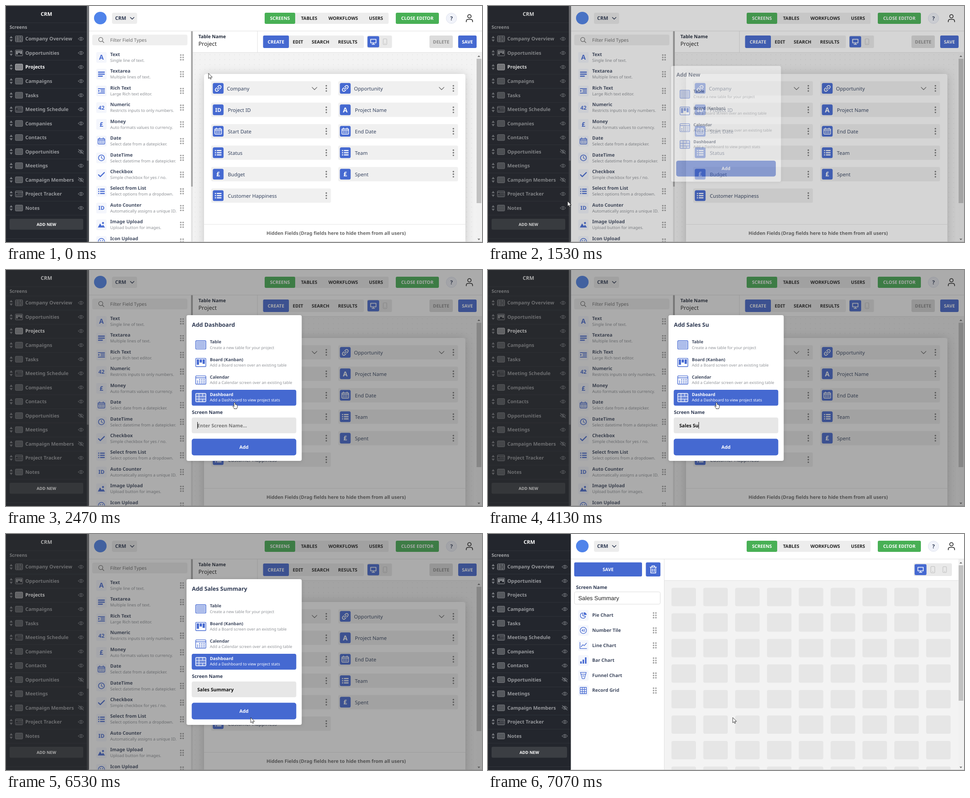
Animation, 1060 px wide and 528 px high, one loop 8.59 s. Source, as an HTML page:

```html
<!DOCTYPE html>
<html lang="en">
<head>
<meta charset="utf-8">
<title>Add a dashboard screen</title>
<style>
html, body { margin: 0; width: 100%; height: 100%; overflow: hidden; background: #fff; }
svg { display: block; font-family: "Noto Sans", "Open Sans", sans-serif; }
text { white-space: pre; text-rendering: geometricPrecision; }
</style>
</head>
<body>
<svg id="stage" width="1060" height="528" viewBox="0 0 1060 528"></svg>
<script>
const BLUE = '#4569d1', GREEN = '#48b055', INK = '#303b54', SOFT_INK = '#414b61', GREY = '#8d9095';
const LOOP = 8590, STEP = 1000 / 15;

const rect = (x, y, w, h, fill, rx = 0, extra = '') =>
  `<rect x="${x}" y="${y}" width="${w}" height="${h}" rx="${rx}" fill="${fill}" ${extra}/>`;
const text = (x, y, str, size, weight = 400, fill = INK, anchor = 'start', extra = '') =>
  `<text x="${x}" y="${y}" font-size="${size}" font-weight="${weight}" fill="${fill}" text-anchor="${anchor}" ${extra}>${str}</text>`;
const mid = (x, y, str, size, weight, fill) => text(x, y, str, size, weight, fill, 'middle');
const line = (d, color, width = 1, fill = 'none') =>
  `<path d="${d}" fill="${fill}" stroke="${color}" stroke-width="${width}" stroke-linecap="round" stroke-linejoin="round"/>`;
const shape = (d, fill) => `<path d="${d}" fill="${fill}"/>`;
const dot = (x, y, r, fill) => `<circle cx="${x}" cy="${y}" r="${r}" fill="${fill}"/>`;
const ring = (x, y, r, color, width) =>
  `<circle cx="${x}" cy="${y}" r="${r}" fill="none" stroke="${color}" stroke-width="${width}"/>`;
const at = (x, y, body, scale = 1) => `<g transform="translate(${x} ${y}) scale(${scale})">${body}</g>`;
const each = (list, fn) => list.map(fn).join('');
const times = (n, fn) => Array.from({ length: n }, (_, i) => fn(i)).join('');
const button = (x, y, w, h, label, fill, color = '#fff', size = 10.2, rx = 3) =>
  rect(x, y, w, h, fill, rx) + mid(x + w / 2, y + h / 2 + size * .36, label, size, 700, color);

// Screen type icons, 24 x 20 around the origin
const screenIcons = {
  table: c => times(5, i => line(`M-9 ${-6 + i * 3}H9`, c, .9)),
  board: c => shape('M-9-7h5v12h-5zM-2.5-7h5v7h-5zM4-7h5v10h-5z', c),
  cal: c => line('M-11-5H11', c, 1.6) +
    times(12, i => i ? dot(-7 + i % 4 * 4.7, -1.2 + Math.floor(i / 4) * 3.7, 1.2, c) : ''),
  dash: c => line('M-11-2.5H11M-11 3.5H11M-4-9V-2.5M4-9V-2.5M-4-2.5V9M4 3.5V9', c, 1.1)
};
const screenIcon = (type, x, y, c, scale = 1) => {
  const tint = type === 'table' || type === 'dash' ? .2 : 0;
  return at(x, y, rect(-11.3, -9.3, 22.6, 18.6, c, 1.5,
    `fill-opacity="${tint}" stroke="${c}" stroke-width="1.4"`) + screenIcons[type](c), scale);
};

// Field and chart icons, about 16 x 16 around the origin
const letter = (s, size) => c => mid(0, size * .36, s, size, 700, c);
const glyphs = {
  text: letter('A', 15), num: letter('42', 12), money: letter('£', 14), id: letter('ID', 12),
  area: c => line('M-6.5-4.5H6.5M-6.5 0H6.5M-6.5 4.5H2', c, 2.4),
  rich: c => line('M-7-5H7M-1-1.7H7M-1 1.7H7M-7 5H7', c, 1.7) + shape('M-7-2.6L-3.5 0L-7 2.6z', c),
  cal: c => rect(-7.5, -5.5, 15, 12, 'none', 1.5, `stroke="${c}" stroke-width="1.5"`) +
    line('M-7-2.5H7M-4-7.5V-5M4-7.5V-5', c, 1.4) +
    times(6, i => rect(-4.8 + i % 3 * 3.7, -.6 + Math.floor(i / 3) * 3, 2, 2, c)),
  clock: c => ring(0, 0, 6.5, c, 1.6) + line('M0-3.5V0L2.5 2', c, 1.4),
  check: c => line('M-6.5 .5L-2.5 4.5L6.5-4.5', c, 2.2),
  list: c => times(3, i => rect(-7.3, -6 + i * 4.8, 2.4, 2.4, c) + rect(-3, -6 + i * 4.8, 10.3, 2.4, c)),
  image: c => shape('M-8 6L-3-3L1 3L3.5 0L8 6z', c) + dot(3.5, -4, 2.2, c),
  smile: c => ring(0, 0, 7, c, 1.4) + dot(-2.4, -2, 1.1, c) + dot(2.4, -2, 1.1, c) + line('M-3.3 2Q0 5.6 3.3 2', c, 1.3),
  link: c => `<g transform="rotate(-45)">${line('M-1.5-3.3H-4.5A3.3 3.3 0 0 0-4.5 3.3H-1.5M1.5-3.3H4.5A3.3 3.3 0 0 1 4.5 3.3H1.5M-3 0H3', c, 1.7)}</g>`,
  pie: c => line('M-1.5-5.5A6 6 0 1 0 5 2.5L-1.5 .5Z', c, 1.4) + shape('M1-7A6.5 6.5 0 0 1 7.5-1L1-1z', c),
  tile: c => ring(0, 0, 7, c, 1.3) + mid(0, 2.5, '42', 7, 700, c),
  chart: c => line('M-7.5-7V7H7.5M-5 3L-1-1.5L2 .5L7-5', c, 1.3),
  bars: c => shape('M-7 2h3.4v5h-3.4zM-1.7-2h3.4v9h-3.4zM3.6-7h3.4v14h-3.4z', c),
  funnel: c => line('M-6.5-7H6.5L2.5 7H-2.5ZM-5-2.8H5M-2 1H2', c, 1.3),
  grid: c => line('M-7-7H7V7H-7ZM-2.3-7V7M2.3-7V7M-7-2.3H7M-7 2.3H7', c, 1.3),
  monitor: c => line('M-6-5.5H6V2.5H-6ZM0 2.5V5.5M-3 5.8H3', c, 1.5),
  phone: c => rect(-4, -6.5, 8, 13, 'none', 1.5, `stroke="${c}" stroke-width="1.2"`) + dot(0, 4, .9, c),
  trash: c => line('M-7-5H7M-3-5V-8H3V-5M-5.5-5V8H5.5V-5M-2-1.5V5M2-1.5V5', c, 1.6)
};
const glyph = (name, x, y, c, scale = 1) => at(x, y, glyphs[name](c), scale);
const chevron = (x, y, w, c, width) => line(`M${x - w} ${y - w / 2}L${x} ${y + w / 2}L${x + w} ${y - w / 2}`, c, width);
const grip = (x, y) => times(6, i => dot(x - 2.6 + i % 2 * 5.2, y - 5.2 + Math.floor(i / 2) * 5.2, 1.8, '#a2a2a2'));

const screens = [
  ['Company Overview', 'dash'], ['Opportunities', 'board'], ['Projects', 'table'], ['Campaigns', 'table'],
  ['Tasks', 'table'], ['Meeting Schedule', 'cal'], ['Companies', 'table'], ['Contacts', 'table'],
  ['Opportunities', 'table', 1], ['Meetings', 'table'], ['Campaign Members', 'table', 1],
  ['Project Tracker', 'cal'], ['Notes', 'table']
];

function eye(x, y, hidden) {
  const c = '#85888d';
  return line(`M${x - 6} ${y}Q${x} ${y - 7.6} ${x + 6} ${y}Q${x} ${y + 7.6} ${x - 6} ${y}Z`, c) +
    ring(x, y, 1.9, c, 1) + (hidden ? line(`M${x - 5.5} ${y - 5}L${x + 5.5} ${y + 5}`, c, 1.2) : '');
}

function sidebar(width, active, id) {
  const rows = each(screens, ([name, icon, hidden], i) => {
    const y = 73.5 + i * 31.54, c = i === active ? '#fff' : '#97999d';
    return rect(0, y - 15.8, width, 1, '#30333a') +
      shape(`M8 ${y - 1.6}L11.5 ${y - 6.6}L15 ${y - 1.6}zM8 ${y + 1.6}L11.5 ${y + 6.6}L15 ${y + 1.6}z`, '#777a7f') +
      screenIcon(icon, 29, y, c, .7) + text(43, y + 3.9, name, 10.8, 600, c) + eye(width - 13, y, hidden);
  });
  return rect(0, 0, 184.5, 528, '#23262d') + mid(width / 2, 22, 'CRM', 11.4, 700, '#fff') +
    rect(0, 37, width, 1, '#30333a') + text(8, 51, 'Screens', 10.2, 600, '#a3a5a8') + rows +
    rect(0, 467.5, width, 1, '#30333a') + rect(8, 476, width - 16, 24.5, '#3b3e43', 3, `id="${id}"`) +
    mid(width / 2, 491.5, 'ADD NEW', 9.1, 700, '#fff') + rect(0, 520, width, 1, '#30333a') +
    (width < 184 ? rect(180, 0, 4.5, 528, '#42454a') + rect(180, 0, 4.5, 346, '#74767a') : '');
}

function header() {
  const tabs = [['TABLES', 675], ['WORKFLOWS', 751], ['USERS', 824]];
  return rect(184, 0, 876, 56, '#fff') + dot(210, 27, 14, '#4f83ea') +
    rect(236, 15, 56, 25, '#ededed', 4) + text(243, 31.3, 'CRM', 11, 700) + chevron(281, 27.5, 4, INK, 1.6) +
    rect(576, 15, 276, 25, '#ededed', 3) + button(576, 15, 68, 25, 'SCREENS', GREEN) +
    each(tabs, ([name, x]) => mid(x, 31.2, name, 10.2, 700, '#222')) +
    button(868, 15, 96, 25, 'CLOSE EDITOR', GREEN) +
    `<circle cx="992" cy="27.5" r="11.7" fill="#f1f3fa" stroke="#dfe3ef"/>` + mid(992, 32, '?', 12, 600, INK) +
    ring(1032, 23, 3.8, '#222', 1.6) + line('M1025 35.5V34Q1025 30 1029 30H1035Q1039 30 1039 34V35.5', '#222', 1.6) +
    rect(184, 55.5, 876, 1, '#e0e0e0');
}

const scrollbar = (top, thumb) => rect(1047.5, top, 12.5, 528 - top, '#f1f1f1') +
  shape(`M1050 ${top + 10}L1053 ${top + 6.5}L1056 ${top + 10}zM1050 520.5L1053 524L1056 520.5z`, '#707070') +
  rect(1048, top + 14, 10.5, thumb, '#c1c1c1');

const fieldTypes = [
  ['text', 'Text', 'Single line of text.'], ['area', 'Textarea', 'Multiple lines of text.'],
  ['rich', 'Rich Text', 'Large Rich text editor.'], ['num', 'Numeric', 'Restricts inputs to only numbers.'],
  ['money', 'Money', 'Auto formats values to currency.'], ['cal', 'Date', 'Select date from a datepicker.'],
  ['clock', 'DateTime', 'Select datetime from a datepicker.'], ['check', 'Checkbox', 'Simple checkbox for yes / no.'],
  ['list', 'Select from List', 'Select options from a dropdown.'], ['id', 'Auto Counter', 'Automatically assigns a unique ID.'],
  ['image', 'Image Upload', 'Upload button for images.'], ['smile', 'Icon Upload', 'Upload button for icons.']
];
const fields = [
  ['link', 'Company'], ['link', 'Opportunity'], ['id', 'Project ID'], ['text', 'Project Name'],
  ['cal', 'Start Date'], ['cal', 'End Date'], ['list', 'Status'], ['list', 'Team'],
  ['money', 'Budget'], ['money', 'Spent'], ['list', 'Customer Happiness']
];

function tablePage() {
  const types = each(fieldTypes, ([icon, name, note], i) => {
    const y = 115 + i * 37.45;
    return rect(201, y - 12, 23, 24, '#f4f6fc', 3) + glyph(icon, 212.5, y, BLUE) +
      text(232, y - 3.2, name, 10.4, 600, SOFT_INK) + text(232, y + 9.8, note, 9.2, 400, GREY) + grip(391.8, y);
  });
  const cards = each(fields, ([icon, name], i) => {
    const x = 457 + i % 2 * 283, y = 184.3 + Math.floor(i / 2) * 48, linked = icon === 'link';
    return rect(x, y - 16, 266.5, 32, '#f0f0f0', 3) + rect(x + 3.5, y - 12, 24, 24, BLUE, 3.5) +
      glyph(icon, x + 15.5, y, '#fff') + text(x + (linked ? 35 : 37), y + 4.2, name, 11.15, 400, '#35435f') +
      (linked ? chevron(x + 230, y + .3, 5.4, '#666', 1.3) : '') +
      times(3, k => dot(x + 256.3, y - 5.8 + k * 5.8, 1.7, '#777'));
  });
  const tabs = [['EDIT', 650], ['SEARCH', 700.5], ['RESULTS', 761]];
  return rect(416, 104, 632, 424, '#f3f3f3') + rect(416, 104, 632, 424, 'url(#dots)') +
    rect(441, 152, 582, 390, '#fff', 5, 'filter="url(#cardShadow)"') + cards +
    rect(441, 488, 582, 1, '#e6e6e6') + text(580, 512, 'Hidden Fields', 10.55, 600, '#666') +
    text(653, 512, '(Drag fields here to hide them from all users)', 10.6, 600, '#666') +
    rect(184, 56, 232, 472, '#fff') + rect(192, 64, 212, 24, '#efefef', 4) +
    ring(211, 75, 4.6, '#666', 1.2) + line('M214.5 78.5L218 82', '#666', 1.2) +
    text(232, 79.8, 'Filter Field Types', 10.4, 400, '#6b6b6b') + types +
    rect(412, 56, 4, 472, '#e4e4e4') + rect(412, 56, 4, 348, '#aaa') +
    rect(416, 56, 644, 48, '#fff') + rect(416, 103.5, 644, 1, '#e0e0e0') + rect(559.5, 56, 1, 48, '#e0e0e0') +
    text(428.5, 72, 'Table Name', 10.4, 600, '#222a3a') + text(428.5, 88.5, 'Project', 12.5, 400, '#222') +
    rect(572.5, 66, 224.5, 28, '#ededed', 3) + button(572.5, 66, 57.5, 28, 'CREATE', BLUE) +
    each(tabs, ([name, x]) => mid(x, 83.5, name, 10.2, 700, '#222')) +
    rect(804, 66, 55.5, 28, '#e9e9e9', 3) + rect(805, 67.5, 26, 25, BLUE, 3) + glyph('monitor', 818, 80, '#fff') +
    glyph('phone', 844, 80, '#c4c4c4') + button(943, 66, 52, 28, 'DELETE', '#dcdcdc', '#8a8a8a') +
    button(1007, 66, 41, 28, 'SAVE', BLUE) + scrollbar(104, 323) +
    header() + sidebar(180, 2, 'addNew');
}

const charts = [['pie', 'Pie Chart'], ['tile', 'Number Tile'], ['chart', 'Line Chart'],
  ['bars', 'Bar Chart'], ['funnel', 'Funnel Chart'], ['grid', 'Record Grid']];

function dashboardPage() {
  const items = each(charts, ([icon, name], i) => {
    const y = 182 + i * 33.65;
    return rect(201, y - 12, 23, 24, '#f4f6fc', 3) + glyph(icon, 212.3, y, BLUE) +
      text(232, y + 3.2, name, 10.35, 600, SOFT_INK) + grip(371.3, y);
  });
  const tiles = times(72, i =>
    rect(408.5 + i % 9 * 70.9, 120.5 + Math.floor(i / 9) * 57.1, 54.6, 41, '#e6e6e6', 4));
  return rect(184, 56, 208, 472, '#fff') + button(192, 63.5, 151, 31.5, 'SAVE', BLUE) +
    rect(351.5, 63.5, 32.5, 31.5, BLUE, 3) + glyph('trash', 368, 79.3, '#fff') +
    text(196, 123, 'Screen Name', 10.55, 600) +
    rect(192.5, 129.5, 191, 27.5, '#fff', 3, 'stroke="#dcdcdc"') +
    text(201, 147.5, 'Sales Summary', 12.9, 400, '#222', 'start', 'font-family="Liberation Sans, Arial, sans-serif"') +
    items + rect(392, 104, 656, 424, '#f3f3f3') + `<g id="tiles">${tiles}</g>` +
    rect(392, 56, 656, 48, '#fff') + rect(392, 103.5, 656, 1, '#e0e0e0') + rect(392, 56, 1, 472, '#e0e0e0') +
    rect(948, 65.5, 85, 28.5, '#e9e9e9', 3) + rect(950, 67.5, 26.5, 24.5, BLUE, 3) +
    glyph('monitor', 963.3, 80, '#fff') + glyph('phone', 990.5, 79.7, '#c4c4c4', 1.1) + glyph('phone', 1017, 79.7, '#c4c4c4') +
    scrollbar(56, 303) + header() + sidebar(184, -1, 'addNewWide');
}

const choices = [['table', 'Table', 'Create a new table for your project'],
  ['board', 'Board (Kanban)', 'Add a Board screen over an existing table'],
  ['cal', 'Calendar', 'Add a Calendar screen over an existing table'],
  ['dash', 'Dashboard', 'Add a Dashboard to view project stats']];
const pen = document.createElement('canvas').getContext('2d');

function modal(picked, typed, caret) {
  const top = picked ? 101 : 127.5, height = picked ? 326 : 272;
  const items = each(choices, ([icon, name, note], i) => {
    const y = top + 66.6 + i * 39.3, on = picked && i === 3;
    return (on ? rect(413.6, y - 17.5, 232.8, 35.4, BLUE, 4) : '') + screenIcon(icon, 433.8, y, on ? '#fff' : BLUE) +
      text(454, y - 3.2, name, 9.65, 600, on ? '#fff' : SOFT_INK) + text(454, y + 8.9, note, 8.8, 400, on ? '#fff' : '#8f9297');
  });
  pen.font = '700 10.65px "Noto Sans", "Open Sans", sans-serif';
  pen.textRendering = 'geometricPrecision';
  const caretX = 426 + pen.measureText(typed).width;
  const form = !picked ? '' : text(414, 322, 'Screen Name', 10.45, 600) + rect(413.6, 330, 232.8, 35.2, '#e7e7e7', 4) +
    text(426, 351.5, typed || 'Enter Screen Name...', 10.65, 700, typed ? '#111' : '#777') +
    (caret ? rect(caretX, 340, 1, 15, '#111') : '');
  return rect(402, top, 256.5, height, '#fff', 4, 'filter="url(#shadow)"') +
    text(414, top + 25.5, 'Add ' + (picked ? typed || 'Dashboard' : 'New'), 12.55, 600) + items + form +
    button(413.6, top + height - 49.5, 232.8, 37.2, 'Add', BLUE, '#fff', 10.4, 5);
}

document.getElementById('stage').innerHTML = `
  <defs>
    <pattern id="dots" x="416" y="104" width="11" height="11" patternUnits="userSpaceOnUse">${dot(5, 5, .8, '#dedede')}</pattern>
    <filter id="shadow" x="-10%" y="-10%" width="120%" height="120%"><feDropShadow dx="0" dy="1" stdDeviation="4" flood-opacity=".14"/></filter>
    <filter id="cardShadow" x="-10%" y="-12%" width="120%" height="124%"><feDropShadow dx="0" dy="2" stdDeviation="11" flood-opacity=".2"/></filter>
  </defs>
  <g id="tablePage">${tablePage()}</g><g id="dashboardPage">${dashboardPage()}</g>
  ${rect(184, 527, 876, 1, '#c9c9c9')}
  ${rect(0, 0, 1060, 528, '#2d2d2d', 0, 'id="veil"')}
  <g id="modal"></g>
  <g id="arrow">${line('M0 0V11.3L2.6 8.9L4.4 12.8L6.2 12L4.5 8.2H8Z', '#222', .9, '#fff')}</g>
  <g id="hand">${line('M-1.3 1Q0-.6 1.3 1V5Q2.6 4.3 3.3 5.5Q4.6 5 5 6.3Q6.4 6.2 6.3 7.8V10Q6.2 12 5 13.2V14.5H-1V13.2Q-2.8 11.5-4 8.9Q-3.6 7.4-2.2 8.3L-1.3 9.2Z', '#222', .9, '#fff')}</g>`;
const ui = Object.fromEntries(['tablePage', 'dashboardPage', 'tiles', 'veil', 'modal', 'arrow', 'hand', 'addNew']
  .map(id => [id, document.getElementById(id)]));

const ease = (t, from, to) => {
  const p = Math.min(1, Math.max(0, (t - from) / (to - from)));
  return p * p * (3 - 2 * p);
};
const lerp = (a, b, p) => a + (b - a) * p;
const show = (el, on) => el.setAttribute('visibility', on ? 'visible' : 'hidden');

const NAME = 'Sales Summary';
const keyTimes = [3200, 3300, 3400, 3530, 3630, 3730, 4000, 4130, 4400, 4470, 4530, 4670, 4730];
const caretOff = [[3000, 3200], [5270, 5800], [6330, LOOP]];
const route = [[1200, 123, 485], [1533, 177, 437], [1800, 320, 368], [2067, 449, 319], [2267, 509, 296]];

function pointer(t) {
  if (t < 1200) {
    const p = ease(t, 150, 1000);
    return [lerp(451, 123, p), lerp(151, 485, p)];
  }
  if (t < 2267) {
    const i = route.findIndex(k => k[0] > t), [a, b] = [route[i - 1], route[i]];
    const p = (t - a[0]) / (b[0] - a[0]);
    return [lerp(a[1], b[1], p), lerp(a[2], b[2], p)];
  }
  const p = ease(t, 5610, 6000);
  return [lerp(509, 545, p), lerp(296, 411, p)];
}

let modalKey = '';
function draw(time) {
  const t = Math.floor((time + 4) / STEP) * STEP;
  const [x, y] = pointer(t);
  const onAdd = t < 1400 && y > 476 && x < 172;
  const onChoice = t > 2000 && t < 5900 && y < 320;
  const onConfirm = y > 378 && t > 5600 && time < 6330;
  const hand = onAdd || onChoice || onConfirm;
  const open = time < 6480 ? ease(t, 1367, 1700) : 1 - ease(t, 6535, 6870);
  const done = time >= 6860;

  show(ui.tablePage, !done);
  show(ui.dashboardPage, done);
  ui.tiles.setAttribute('opacity', ease(t, 6800, 7060));
  ui.addNew.setAttribute('fill', onAdd ? '#53565b' : '#3b3e43');
  ui.veil.setAttribute('opacity', open * .4);
  ui.modal.setAttribute('opacity', open);
  ui.modal.setAttribute('transform', `translate(530 264) scale(${.906 + .094 * open}) translate(-530 -264)`);

  const picked = time >= 2470;
  const typed = NAME.slice(0, keyTimes.filter(k => time >= k).length);
  const caret = picked && !caretOff.some(([a, b]) => time >= a && time < b);
  const key = [picked, typed, caret].join();
  if (key !== modalKey) ui.modal.innerHTML = modal(picked, typed, caret);
  modalKey = key;

  show(ui.arrow, !hand);
  show(ui.hand, hand);
  ui[hand ? 'hand' : 'arrow'].setAttribute('transform', `translate(${x} ${y})`);
}

const start = performance.now();
function tick() {
  draw((performance.now() - start) % LOOP);
  requestAnimationFrame(tick);
}
tick();
</script>
</body>
</html>
```
